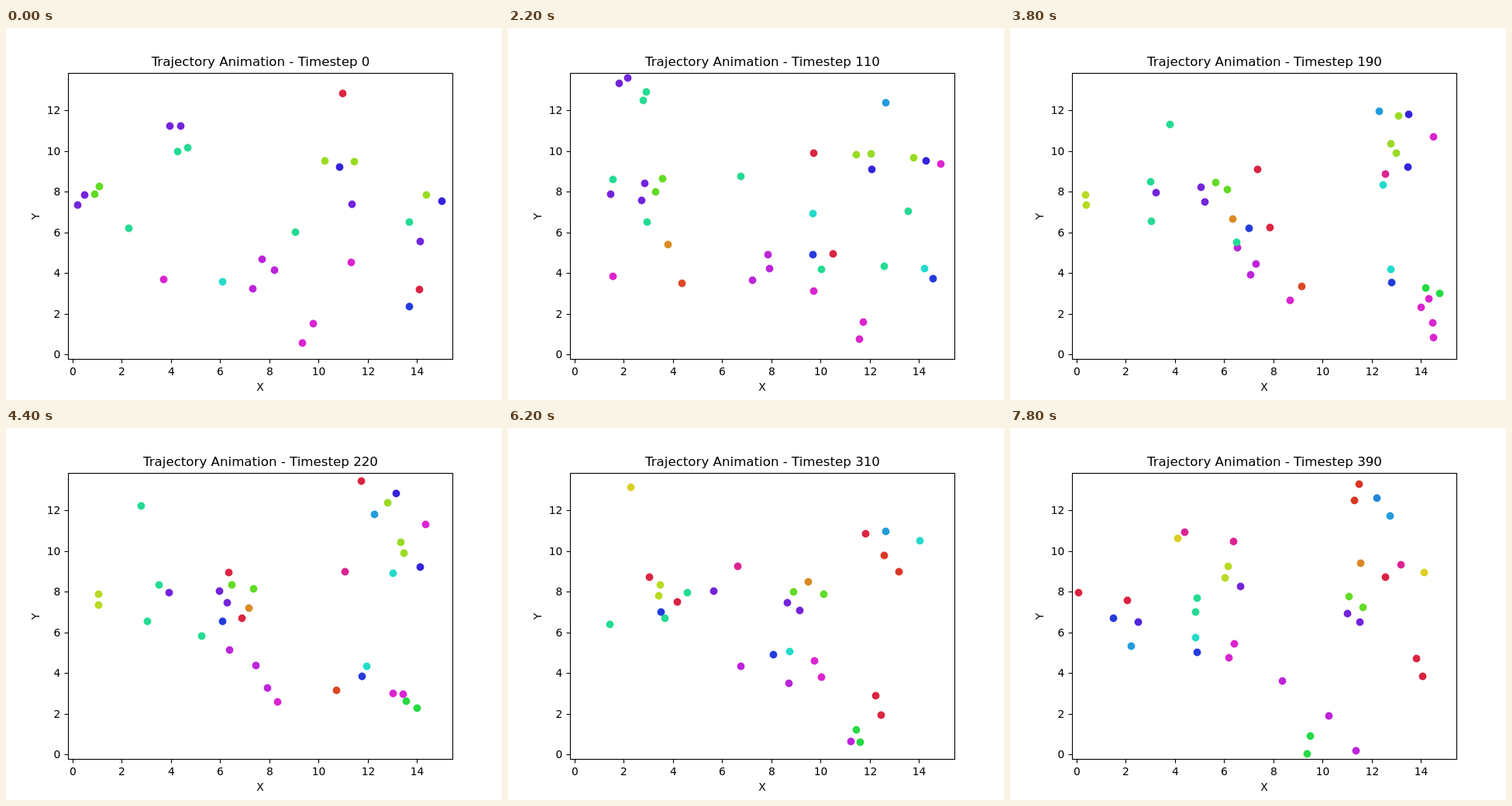
Animation of 640x480 px, one loop 8 s. Source, as an HTML page:

```html
<!DOCTYPE html>
<html lang="en">
<head>
<meta charset="utf-8">
<title>Trajectory Animation</title>
<style>
  html, body { margin: 0; width: 100%; height: 100%; overflow: hidden; background: #fff; }
  svg { display: block; width: 640px; height: 480px; }
  text { font: 13.89px "DejaVu Sans", sans-serif; text-anchor: middle; }
  #title { font-size: 16.67px; }
  .end { text-anchor: end; }
  .line { fill: none; stroke: #000; stroke-width: 1.11; }
</style>
</head>
<body>
<svg viewBox="0 0 640 480">
  <g id="dots"></g>
  <g id="axes"></g>
  <rect class="line" x="80.5" y="58.5" width="496" height="369"/>
  <text id="title" x="328.5" y="49"></text>
  <text x="328" y="468">X</text>
  <text transform="translate(43 243) rotate(-90)">Y</text>
</svg>
<script>
const FRAME_MS = 200, STEPS_PER_FRAME = 10, END = 390, RIGHT_EDGE = 569;
const title = document.getElementById('title');
const dots = document.getElementById('dots');
const axes = document.getElementById('axes');
const walkers = [];

function add(parent, tag, attributes, text = '') {
  const node = document.createElementNS('http://www.w3.org/2000/svg', tag);
  for (const name in attributes) node.setAttribute(name, attributes[name]);
  node.textContent = text;
  return parent.appendChild(node);
}

for (let v = 0; v <= 14; v += 2) {
  const x = Math.floor(86 + v * 31.75);
  add(axes, 'path', { class: 'line', d: `M${x + 0.5} 427.5v5` });
  add(axes, 'text', { x: x + 0.5, y: 448 }, v);
  if (v > 12) continue;
  const y = Math.round(421.4 - v * 26.25);
  add(axes, 'path', { class: 'line', d: `M80.5 ${y + 0.5}h-5` });
  add(axes, 'text', { class: 'end', x: 70.3, y: y + 5 }, v);
}

// A smooth curve through [x, y] points that are evenly spaced in time, u = 0..1.
function along(points, u) {
  const last = points.length - 1;
  const i = Math.min(Math.floor(u * last), last - 1), f = u * last - i, g = 1 - f;
  return [0, 1].map(axis => {
    const at = k => points[k][axis];
    const step = at(i + 1) - at(i);
    const inner = k => (at(k + 1) - at(k - 1)) / 2;
    const a = i > 0 ? inner(i) : last > 1 ? 2 * step - inner(1) : step;
    const b = i + 1 < last ? inner(i + 1) : last > 1 ? 2 * step - inner(i) : step;
    return at(i) + step * f * f * (3 - 2 * f) + f * g * (a * g - b * f);
  });
}

function walk(hue, from, to, ...points) {
  const dot = add(dots, 'circle', { r: 4.9, fill: `hsl(${hue} 72% 50%)` });
  walkers.push({ dot, from, to, place: u => along(points, u) });
}

// Two people together; the gap between them changes evenly.
function pair(hue, from, to, gapStart, gapEnd, ...points) {
  walk(hue, from, to, ...points);
  walk(hue, from, to, ...points);
  walkers.at(-1).place = u => {
    const gap = along([gapStart, gapEnd], u);
    return along(points, u).map((value, axis) => value + gap[axis]);
  };
}

const RED = 350, VERMILION = 6, RUST = 12, ORANGE = 33, YELLOW = 56, CHARTREUSE = 72,
  LIME = 82, LEAF = 100, GREEN = 130, MINT = 156, CYAN = 174, SKY = 201, AZURE = 208,
  BLUE = 232, INDIGO = 245, IRIS = 255, PURPLE = 266, VIOLET = 290, MAGENTA = 304, PINK = 324;

// Present at the start
pair(PURPLE, 0, 120, [14, 0], [11, -8], [211, 126], [178, 94], [135, 67]);
pair(MINT, 0, 160, [13, -5], [0, -14], [221, 159], [192, 109], [135, 71]);
pair(MAGENTA, 0, 200, [-14, 25], [2, 19], [396, 381], [406, 375], [489, 381], [553, 379]);
walk(RED, 0, END, [434, 84], [402, 155], [314, 183], [202, 189], [88, 212]);
walk(RED, 0, END, [533, 337], [398, 283], [264, 233], [151, 222]);
walk(BLUE, 0, END, [520, 359], [371, 282], [241, 241], [133, 245]);
walk(LIME, 0, 300, [411, 171], [445, 164], [497, 148], [560, 152]);
walk(LIME, 0, 300, [449, 172], [481, 161], [562, 166]);
walk(LIME, 0, 280, [542, 215], [527, 177], [502, 115], [474, 64]);
walk(INDIGO, 0, 260, [430, 179], [459, 183], [502, 179], [567, 179]);
walk(INDIGO, 0, 240, [562, 223], [536, 165], [495, 64]);
walk(PURPLE, 0, END, [92, 228], [190, 222], [327, 229], [451, 250]);
walk(PURPLE, 0, END, [101, 215], [192, 200], [313, 217], [435, 239]);
walk(LEAF, 0, END, [114, 214], [209, 211], [364, 208], [455, 231]);
walk(LEAF, 0, END, [120, 204], [215, 194], [325, 207], [437, 217]);
walk(MINT, 0, END, [158, 258], [181, 249], [187, 248], [239, 237]);
walk(MINT, 0, 145, [373, 263], [562, 228]);
walk(MINT, 0, 270, [520, 250], [331, 206], [217, 132], [126, 62]);
walk(CYAN, 0, 380, [279, 327], [376, 248], [481, 202], [522, 156], [550, 114]);
walk(VIOLET, 0, END, [318, 336], [316, 327], [313, 320], [432, 396], [446, 416]);
walk(VIOLET, 0, END, [330, 298], [339, 293], [292, 283], [294, 303], [351, 326]);
walk(VIOLET, 0, END, [346, 312], [340, 311], [317, 304], [353, 323], [411, 371]);
walk(MAGENTA, 0, 150, [203, 324], [163, 319], [95, 325]);
walk(MAGENTA, 0, 220, [445, 302], [394, 339], [350, 353]);
walk(PURPLE, 0, 95, [446, 227], [567, 231]);
walk(PURPLE, 0, 90, [534, 275], [479, 266]);

// Entering from the left
pair(CHARTREUSE, 180, END, [1, 13], [-4, 15], [90, 215], [173, 207], [281, 178]);
walk(ORANGE, 20, END, [92, 314], [243, 266], [351, 213], [452, 174]);
walk(RUST, 40, 300, [94, 337], [255, 329], [416, 337], [530, 360]);
walk(MINT, 40, END, [92, 199], [162, 196], [221, 208], [241, 219]);
walk(PURPLE, 50, END, [89, 218], [169, 212], [247, 211], [297, 204]);
walk(IRIS, 340, END, [90, 245], [165, 250]);
walk(SKY, 340, END, [88, 288], [156, 281]);

// Entering from the right
pair(GREEN, 150, END, [22, 3], [-4, 23], [562, 310], [509, 357], [449, 389], [387, 397]);
pair(VERMILION, 230, END, [44, 20], [-6, 21], [552, 271], [485, 164], [450, 72]);
walk(MINT, 10, 340, [564, 400], [389, 305], [239, 266], [91, 252]);
walk(MINT, 20, 140, [559, 316], [460, 304]);
walk(MAGENTA, 60, 240, [564, 191], [552, 159], [538, 113]);
walk(CYAN, 60, END, [551, 301], [505, 313], [402, 294], [239, 270]);
walk(BLUE, 90, END, [556, 318], [492, 328], [367, 295], [241, 289]);
walk(PINK, 140, END, [562, 193], [432, 185], [299, 179], [288, 146]);
walk(MAGENTA, 160, END, [560, 380], [437, 314], [289, 278]);
walk(MAGENTA, 160, END, [565, 355], [450, 330], [282, 296]);
walk(PINK, 350, END, [565, 178], [504, 176]);
walk(YELLOW, 370, END, [560, 184], [534, 186]);

// Entering from the top or inside the plot
pair(RED, 230, END, [6, 26], [8, 23], [428, 348], [474, 345], [524, 297]);
walk(SKY, 40, END, [503, 75], [484, 100], [475, 110], [486, 133], [490, 113]);
walk(RED, 220, END, [458, 68], [460, 132], [484, 192]);
walk(YELLOW, 300, END, [151, 68], [216, 142]);
walk(PINK, 340, END, [170, 72], [225, 134]);
walk(AZURE, 370, END, [470, 70], [473, 90]);

function draw(now) {
  const step = Math.floor(now / FRAME_MS) * STEPS_PER_FRAME % (END + STEPS_PER_FRAME);
  title.textContent = `Trajectory Animation - Timestep ${step}`;
  for (const { dot, from, to, place } of walkers) {
    const present = step >= from && step <= to;
    const [x, y] = present ? place((step - from) / (to - from)).map(Math.round) : [0, 0];
    dot.setAttribute('visibility', present && x < RIGHT_EDGE ? 'visible' : 'hidden');
    dot.setAttribute('cx', x + 0.5);
    dot.setAttribute('cy', y + 0.5);
  }
}

const start = performance.now();
function tick() {
  draw(performance.now() - start);
  requestAnimationFrame(tick);
}
tick();
</script>
</body>
</html>
```
